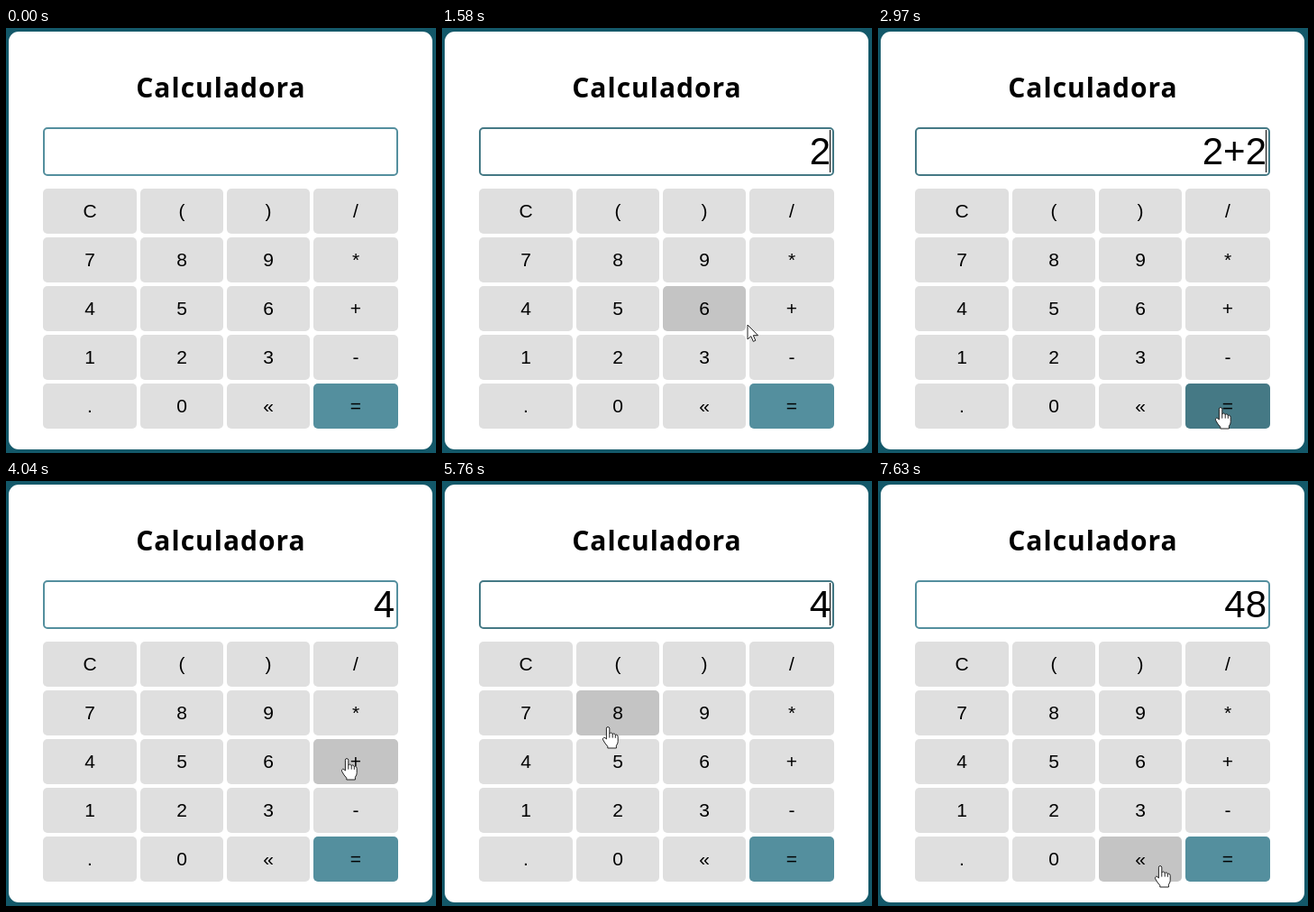
An HTML page that plays this animation: 477x471 px, repeating every 8000 ms.

```html
<!DOCTYPE html>
<html lang="es">
<head>
<meta charset="utf-8">
<title>Calculadora</title>
<style>
  html, body { margin: 0; width: 100%; height: 100%; overflow: hidden; background: #135869; }
  svg { display: block; width: 477px; height: 471px; }
  text { font-family: "Liberation Sans", Arial, sans-serif; font-size: 21px; text-anchor: middle; }
  .title { font: 700 30px "Open Sans", "Noto Sans", sans-serif; letter-spacing: 1px; }
  .value { font-size: 42px; text-anchor: end; }
</style>
</head>
<body>
<svg viewBox="0 0 477 471">
  <rect width="477" height="471" fill="#135869"/>
  <rect x="3" y="4" width="470" height="463" rx="11" fill="#fff"/>
  <text class="title" x="238.5" y="77">Calculadora</text>
  <rect id="field" x="42" y="111" width="392" height="52" rx="4" fill="#fff" stroke-width="2"/>
  <text id="value" class="value" x="431" y="151"></text>
  <path id="caret" d="M430.5 113V160" stroke="#000"/>
  <g id="keys"></g>
  <circle id="halo" r="13" fill="#dfdc40" opacity=".8"/>
  <g id="pointer" fill="#fff" stroke="#222" stroke-linejoin="round">
    <g id="hand">
      <path d="M-1.6 14V2.2Q-1.6.6 0 .6T1.8 2.2V8.4Q2.2 6.9 3.6 7T5.2 8.8Q5.6 7.6 6.9 7.9T8.3 9.8Q8.8 8.8 9.9 9.2T11.2 11.4V16.5Q11.2 19 9.4 21.2V24H-.2V22.2Q-3 19.4-5.4 14.8Q-6 12.8-4.6 12.3T-1.6 14Z"/>
      <path d="M1.8 8.4V12.6M5.2 8.8V12.6M8.3 9.8V12.8" fill="none"/>
    </g>
    <path id="arrow" d="M0 0V16L3.8 12.6L6.3 18.4L8.8 17.3L6.3 11.7H11.5Z"/>
  </g>
</svg>
<script>
const LOOP = 8000, START = 580, STEP = 66.4, HOLD = 130, KEY_HEIGHT = 50;
const $ = id => document.getElementById(id);

function add(parent, tag, attrs) {
  const el = document.createElementNS("http://www.w3.org/2000/svg", tag);
  for (const name in attrs) el.setAttribute(name, attrs[name]);
  return parent.appendChild(el);
}

const edges = [41, 149, 245, 341, 439];
const keys = [..."C()/789*456+123-.0«="].map((label, i) => {
  const col = i % 4, x = edges[col], w = edges[col + 1] - x - 4;
  const y = 178 + 54 * Math.floor(i / 4);
  const box = add($("keys"), "rect", { x, y, width: w, height: KEY_HEIGHT, rx: 5 });
  add($("keys"), "text", { x: x + w / 2, y: y + 32 }).textContent = label;
  return { label, x, y, w, box };
});

function type(text, label) {
  if (label === "C") return "";
  if (label === "«") return text.slice(0, -1);
  if (label === "=") return String(text.split("+").reduce((sum, n) => sum + Number(n), 0));
  return text + label;
}

// Each move glides to a key, offset from its centre, and may press it
const moves = [];
function move(label, leave, arrive, { press, dx = 0, dy = 0, bend = 0 } = {}) {
  const key = keys.find(k => k.label === label);
  const to = [key.x + key.w / 2 + dx, key.y + KEY_HEIGHT / 2 + dy];
  const from = moves.length ? moves[moves.length - 1].to : [328, 462];
  moves.push({ label, leave, arrive, press, from, to, bend });
}
move("2", START, 1000, { press: 1110, dx: 13, dy: -9 });
move("+", 1300, 1720, { press: 1770, dy: 9 });
move("2", 1960, 2445, { press: 2500, dx: 10, dy: 8 });
move("=", 2760, 2980, { press: 3150, dx: -7, dy: 2 });
move("+", 3310, 3580, { bend: 77 });
move("C", 4000, 4300, { press: 4625, dx: -8, dy: 3 });
move("4", 4920, 5180, { press: 5240 });
move("8", 5440, 5840, { press: 5960, dy: 11 });
move("+", 6120, 6430, { press: 6490 });
move("«", 6920, 7180, { press: 7280, dx: 16, dy: 16 });
move("«", 7420, 7630, { dx: 22, dy: 8 });

const clicks = moves.filter(m => m.press);
const smooth = p => p * p * (3 - 2 * p);

function pointerAt(t) {
  const { leave, arrive, from, to, bend } = moves.filter(m => t >= m.leave).pop() || moves[0];
  const p = smooth(Math.min(1, Math.max(0, (t - leave) / (arrive - leave))));
  return from.map((a, i) => a + (to[i] - a) * p + bend * Math.sin(Math.PI * p));
}

const keyAt = ([x, y]) =>
  keys.find(k => x >= k.x && x < k.x + k.w && y >= k.y && y < k.y + KEY_HEIGHT);

const show = (id, on) => $(id).setAttribute("visibility", on ? "visible" : "hidden");

function keyColor(key, hovered, pressed) {
  const shades = key.label === "="
    ? ["#548f9e", "#457985", "#376570"]
    : ["#dfdfdf", "#c4c4c4", "#aaaaa9"];
  return shades[pressed ? 2 : hovered ? 1 : 0];
}

function render(time) {
  const active = time >= START - 6;
  const t = START + Math.floor((time - START + 6) / STEP) * STEP;
  const spot = pointerAt(t);
  const hovered = active && keyAt(pointerAt(t - 30));
  const pressed = clicks.find(c => t >= c.press && t < c.press + HOLD / 2 + HOLD / 2 * (c.label !== "C"));
  const done = clicks.filter(c => t >= c.press && c !== pressed);
  const last = done[done.length - 1];
  const focused = Boolean(last && !pressed && !"C=«".includes(last.label));

  $("value").textContent = done.reduce((text, c) => type(text, c.label), "");
  $("field").setAttribute("stroke", focused ? "#457985" : "#548f9e");
  show("caret", focused && (t - last.press - HOLD) % 1000 < 500);
  for (const key of keys)
    key.box.setAttribute("fill", keyColor(key, key === hovered, pressed && pressed.label === key.label));

  const [x, y] = spot.map(Math.round);
  const overKey = Boolean(keyAt(spot));
  $("pointer").setAttribute("transform", `translate(${x} ${y - 1})`);
  show("hand", active && overKey);
  show("arrow", active && !overKey);
  $("halo").setAttribute("cx", x - 1);
  $("halo").setAttribute("cy", y + 1);
  show("halo", Boolean(pressed));
}

const begin = performance.now();
function tick() {
  render((performance.now() - begin) % LOOP);
  requestAnimationFrame(tick);
}
tick();
</script>
</body>
</html>
```
